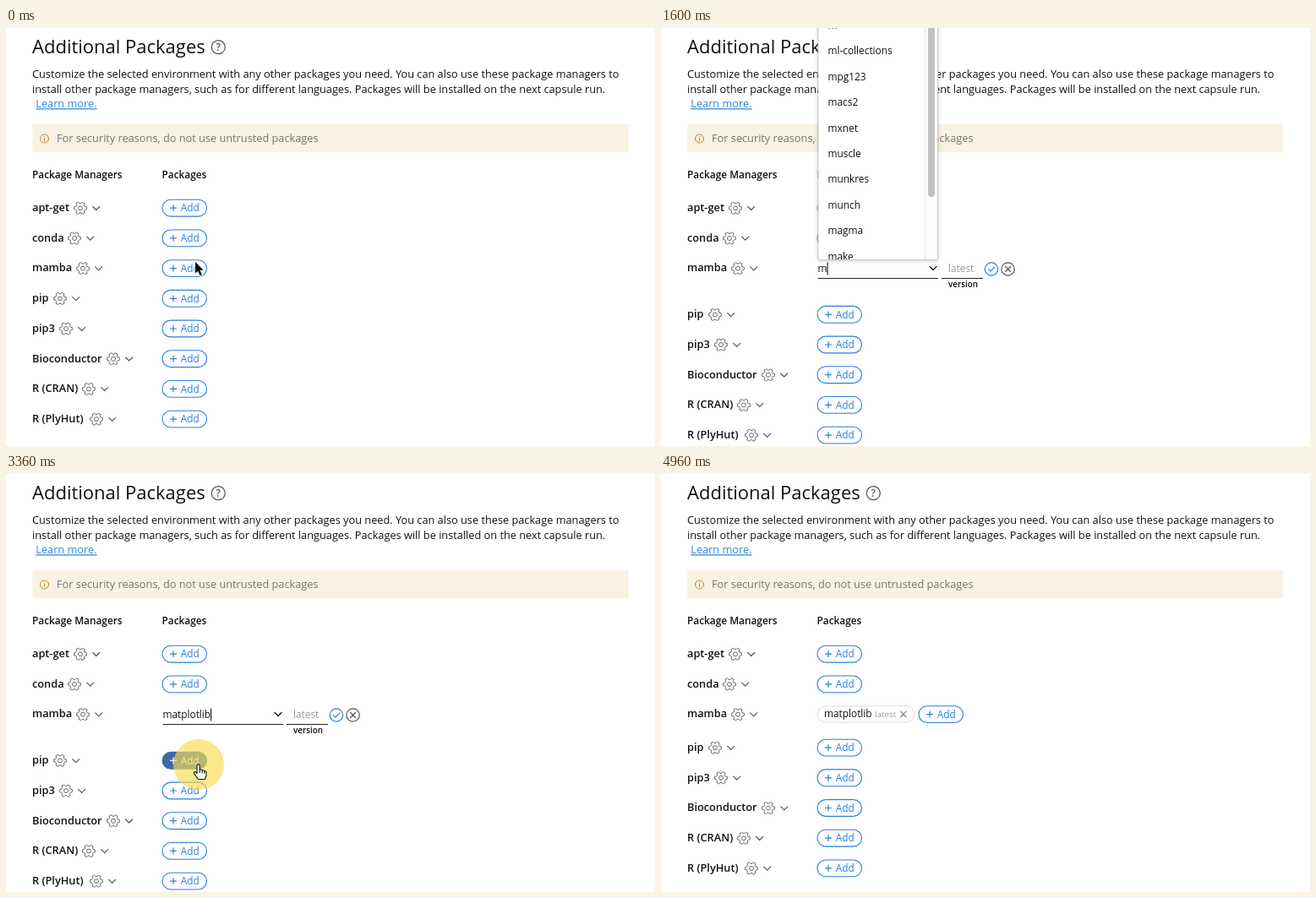
An HTML page for the animation above (5.36 s loop, 768 by 495 pixels).

```html
<!DOCTYPE html>
<html lang="en">
<head>
<meta charset="utf-8">
<title>Additional Packages</title>
<style>
html, body { margin: 0; width: 100%; height: 100%; overflow: hidden; background: #fff; }
svg { display: block; font-family: "Open Sans", "Noto Sans", sans-serif; }
</style>
</head>
<body>
<svg id="stage" width="768" height="495" viewBox="0 0 768 495" fill="none"></svg>
<script>
const LOOP = 5360, STEP = 80;
const TITLE = 22, BODY = 12.76, SMALL = 11.85, TINY = 9.85;
const INK = '#111', BLUE = '#2b7de1', GRAY = '#666', HOVER = '#3a6ba5';
const stage = document.getElementById('stage');

// label and centre of its gear
const managers = [['apt-get', 88], ['conda', 81], ['mamba', 91], ['pip', 64], ['pip3', 71],
  ['Bioconductor', 127], ['R (CRAN)', 98], ['R (PlyHut)', 107]];
const MAMBA = 2, PIP = 3;
const layouts = {
  plain: { pitch: 35.7, extra: 0 },
  edit: { pitch: 35.7, extra: 19 },
  empty: { pitch: 35, extra: 0 },
  done: { pitch: 35.7, extra: 3.8 }
};
const typed = [[0, ''], [1360, 'm'], [1680, 'ma'], [1920, 'mat'], [2080, 'matp'],
  [2240, 'matpl'], [2480, 'matplot'], [3280, 'matplotlib']];
const suggestions = {
  m: ['ml-collections', 'mpg123', 'macs2', 'mxnet', 'muscle', 'munkres', 'munch', 'magma', 'make'],
  ma: ['macs2', 'magma', 'make', 'mafft', 'mako', 'markdown', 'matplotlib', 'mash', 'mamba']
};
const presses = [{ x: 206, y: 285, down: 480, up: 560 },
  { x: 228, y: 344, down: 3280, up: 3440 },
  { x: 393, y: 284.5, down: 3920, up: 4160 }];

const text = (x, y, str, size, fill = INK, weight = 400, more = '') =>
  `<text x="${x}" y="${y}" font-size="${size}" fill="${fill}" font-weight="${weight}" ${more}>${str}</text>`;
const line = (d, color, width = 1.2) =>
  `<path d="${d}" stroke="${color}" stroke-width="${width}" stroke-linecap="round" stroke-linejoin="round"/>`;
const ring = (x, y, r, color, width = 1.2) =>
  `<circle cx="${x}" cy="${y}" r="${r}" stroke="${color}" stroke-width="${width}"/>`;
const chevron = (x, y, color, width) => line(`M${x - 4} ${y - 2}l4 4 4-4`, color, width);
const cross = (x, y, r, color, width) =>
  line(`M${x - r} ${y - r}l${2 * r} ${2 * r}m0 ${-2 * r}l${-2 * r} ${2 * r}`, color, width);

function gear(x, y) {
  const points = [];
  for (let tooth = 0; tooth < 6; tooth++) {
    for (const [turn, r] of [[-.33, 5.7], [-.2, 7.5], [.2, 7.5], [.33, 5.7]]) {
      const angle = (tooth + turn) * Math.PI / 3;
      points.push((x + r * Math.cos(angle)).toFixed(2) + ' ' + (y + r * Math.sin(angle)).toFixed(2));
    }
  }
  return line(`M${points.join('L')}Z`, GRAY, 1) + ring(x, y, 2.5, GRAY, 1);
}

function addButton(x, y, hover) {
  const ink = hover ? '#fff' : BLUE;
  return `<rect x="${x + .5}" y="${y - 9.7}" width="52.5" height="19.8" rx="9.9" fill="${hover ? HOVER : '#fff'}"
    stroke="${hover ? HOVER : BLUE}" stroke-width="1.1"/>` +
    line(`M${x + 10} ${y + .2}h7m-3.5-3.5v7`, ink) + text(x + 22.3, y + 4.4, 'Add', SMALL, ink);
}

function header() {
  return text(31, 30, 'Additional Packages', TITLE) + ring(251.3, 22.7, 8, '#555', 1.3) +
    text(251.3, 27, '?', 12, '#555', 600, 'text-anchor="middle"') +
    text(31, 59, 'Customize the selected environment with any other packages you need. You can also use these package managers to', BODY) +
    text(31, 76.6, 'install other package managers, such as for different languages. Packages will be installed on the next capsule run.', BODY) +
    text(35.3, 94.2, 'Learn more.', BODY, '#3586d6', 400, 'text-decoration="underline"') +
    '<rect x="31.2" y="113.7" width="705.4" height="33.2" rx="2" fill="#f8f2e2"/>' +
    ring(45.5, 131, 5, '#b98b2c', 1) + line('M45.5 130.5v3m0-5v.1', '#b98b2c', 1.1) +
    text(60, 135.4, 'For security reasons, do not use untrusted packages', BODY, '#757575') +
    text(31, 178.3, 'Package Managers', SMALL, INK, 600) + text(184.5, 178.3, 'Packages', SMALL, INK, 600);
}

function rows(mode, hovered) {
  const { pitch, extra } = layouts[mode];
  return managers.map(([label, gearX], i) => {
    const y = 213 + i * pitch + (i > MAMBA ? extra : 0);
    let out = text(31, y + 4, label, BODY, INK, 600) + gear(gearX, y + .3) + chevron(gearX + 18.7, y + .5, '#555');
    if (mode === 'empty' || (mode === 'edit' && i === MAMBA)) return out;
    if (mode === 'done' && i === MAMBA) return out + chip(y) + addButton(304.5, y);
    return out + addButton(184.5, y, i === hovered);
  }).join('');
}

function chip(y) {
  return `<rect x="185" y="${y - 9.6}" width="115" height="19.2" rx="9.6" stroke="#dcdcdc"/>` +
    text(193, y + 4, 'matplotlib', SMALL) + text(253, y + 4, 'latest', TINY, '#999') +
    cross(286.8, y, 3.2, '#777', 1.2);
}

function spinner(t) {
  let out = '';
  for (let i = 0; i < 8; i++) {
    const angle = i * Math.PI / 4, fade = ((i - t / STEP) % 8 + 8) % 8 / 8;
    out += `<circle cx="${322 + 5 * Math.cos(angle)}" cy="${285 + 5 * Math.sin(angle)}" r="1"
      fill="${BLUE}" opacity="${.35 + .65 * fade}"/>`;
  }
  return out;
}

function editor(t, query) {
  const loading = (t >= 1360 && t < 1520) || (t >= 2480 && t < 2720);
  const caret = t < 1040 || t >= 1360;
  return text(185.5, 289.2, query, SMALL, INK, 400, 'id="query"') +
    (caret ? '<path id="caret" d="M0 277.5v15" stroke="#111" stroke-width="1.1"/>' : '') +
    '<path d="M185.5 296.5h142.5M332 296.5h49" stroke="#222"/>' +
    (loading ? spinner(t) : chevron(322, 284.5, '#222', 1.4)) +
    text(340, 289.2, 'latest', SMALL, '#999') + text(340, 307, 'version', TINY, INK, 600) +
    ring(391, 285.5, 7.7, BLUE) + line('M387.5 285.7l2.5 2.5 4.6-4.8', BLUE) +
    ring(410.6, 285.5, 7.7, '#555') + cross(410.6, 285.5, 3, '#555', 1.2);
}

const panel = (y, height) =>
  `<rect x="186" y="${y}" width="141.5" height="${height}" rx="2" fill="#fff" stroke="#c9c9c9"
    style="filter:drop-shadow(0 1px 2px #0003)"/>`;

function menu(t, query) {
  if (t < 1360 || t >= 3280) return '';
  if (t >= 1520 && t < 2480) {
    const items = [query, ...(query === 'm' ? suggestions.m : suggestions.ma)];
    return panel(-40, 314.5) + '<clipPath id="list"><path d="M186 0h142v274H186z"/></clipPath><g clip-path="url(#list)">' +
      items.map((item, i) => text(197.5, 1 + i * 30.4, item, SMALL)).join('') +
      '</g><path d="M312.5 0v274" stroke="#e6e6e6"/><rect x="316" y="-20" width="8" height="220" rx="4" fill="#c1c1c1"/>';
  }
  const items = t >= 2720 ? [query, 'matplotlib'] : [query];
  return panel(298.5, 30 * items.length) +
    items.map((item, i) => text(197.5, 317.7 + i * 30.4, item, SMALL)).join('');
}

function highlight(t) {
  return presses.filter(p => t >= p.down && t < p.up + 160).map(p => {
    const released = Math.max(0, (t - p.up + STEP) / STEP);
    return `<circle cx="${p.x}" cy="${p.y}" r="${30 + 3.8 * released}" fill="#f9dc52" opacity="${.66 - .18 * released}"/>`;
  }).join('');
}

function glide(t, start, end, from, to) {
  const u = Math.min(1, Math.max(0, (t - start) / (end - start)));
  const eased = u * u * (3 - 2 * u);
  return from.map((v, i) => v + (to[i] - v) * eased);
}

function pointer(t) {
  let place, hand = false;
  if (t < 800) {
    place = glide(t, 0, 560, [224, 277], [206, 285]);
    hand = t >= STEP;
  } else if (t >= 3040 && t < 3280) {
    place = glide(t, 3040, 3120, [238, 334], [228, 344]);
  } else if (t >= 3280 && t < 4240) {
    place = glide(t, 3440, 3760, [228, 344], [392, 284]);
    hand = t <= 3440 || t >= 3760;
  } else if (t >= 4240 && t < 4960) {
    place = glide(t, 4640, 4960, [392.6, 283], [392.6, 500]);
  } else return '';
  const shape = hand
    ? '<path d="M-2 1.5C-2-.7 1.2-.7 1.2 1.5V7C1.2 5.6 4.2 5.6 4.2 7.5 4.4 6.3 6.8 6.4 6.8 8.3 7 7.4 9 7.6 9 9.3V12.5C9 15 7.6 15.5 7.6 17.5H-.6C-.8 16-3.5 14-5.5 10.6-6.3 9.2-4.6 8-3.4 9.2L-2 10.6ZM1.2 7v3M4.2 7.5v2.8M6.8 8.3v2.4" fill="#fff" stroke="#111" stroke-width="1.1" stroke-linejoin="round"/>'
    : '<path d="M0 0V13.6L3.1 10.7 5.4 16 7.8 15 5.5 9.8H9.6Z" fill="#000" stroke="#fff" stroke-width="1.6" paint-order="stroke"/>';
  return `<g transform="translate(${place})">${shape}</g>`;
}

function draw(t) {
  const mode = t < 800 ? 'plain' : t < 4240 ? 'edit' : t < 4400 ? 'empty' : 'done';
  const hovered = t >= STEP && t < 800 ? MAMBA : t >= 3280 && t <= 3440 ? PIP : -1;
  const query = typed.filter(([start]) => t >= start).pop()[1];
  stage.innerHTML = header() + rows(mode, hovered) +
    (mode === 'edit' ? editor(t, query) + menu(t, query) : '') + highlight(t) + pointer(t);
  const caret = document.getElementById('caret');
  if (caret) {
    const width = query ? document.getElementById('query').getComputedTextLength() : 0;
    caret.setAttribute('transform', `translate(${186 + width})`);
  }
}

let shown = -1;
function tick() {
  const t = Math.floor(performance.now() % LOOP / STEP) * STEP;
  if (t !== shown) draw(shown = t);
  requestAnimationFrame(tick);
}
tick();
</script>
</body>
</html>
```
